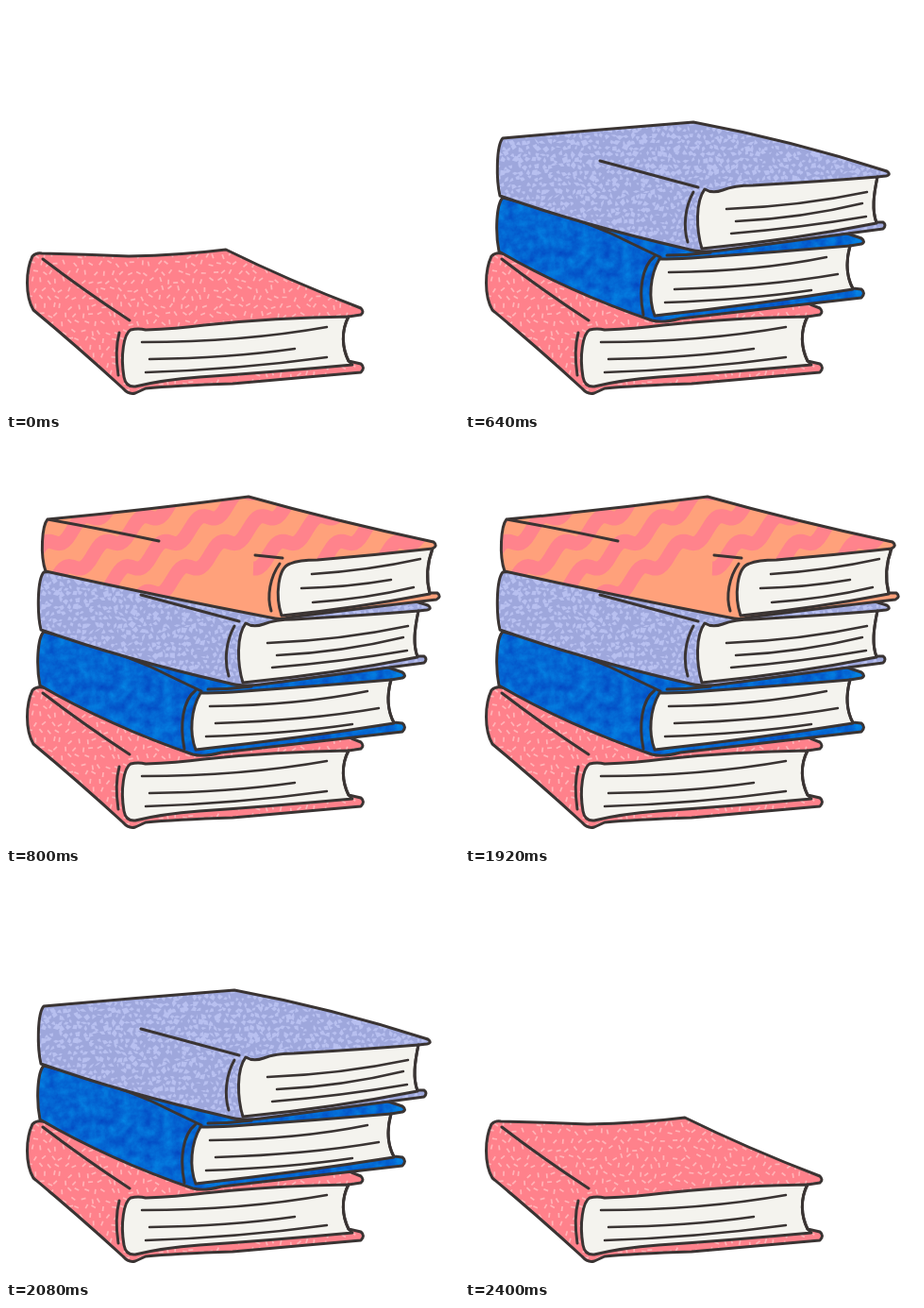
These frames come from a looping animation (480x430 px, 2880 ms). An HTML page:

```html
<!DOCTYPE html>
<html lang="en">
<head>
<meta charset="utf-8">
<title>Book stack</title>
<style>
  html, body { margin: 0; width: 100%; height: 100%; overflow: hidden; background: #fff; }
  svg { display: block; width: 100vw; height: 100vh; }
  .ink { fill: none; stroke: #3a3433; stroke-width: 3; stroke-linecap: round; stroke-linejoin: round; }
  .lines { stroke-width: 2.5; }
  .page { fill: #f4f3ee; }
  .book { animation: 2880ms step-end infinite; }
  #blue { animation-name: blue; }
  #lilac { animation-name: lilac; }
  #orange { animation-name: orange; }
  #sky { animation-name: sky; }
  @keyframes blue { 0%, 83.33% { visibility: hidden; } 16.66% { visibility: visible; } }
  @keyframes lilac { 0%, 77.77% { visibility: hidden; } 22.22% { visibility: visible; } }
  @keyframes orange { 0%, 72.22% { visibility: hidden; } 27.77% { visibility: visible; } }
  @keyframes sky { 0%, 66.66% { visibility: hidden; } 33.33% { visibility: visible; } }
</style>
</head>
<body>
<svg id="stage" viewBox="0 0 480 430">
  <defs>
    <filter id="cloth" x="0" y="0" width="1" height="1" color-interpolation-filters="sRGB">
      <feTurbulence type="fractalNoise" baseFrequency=".09" numOctaves="5" seed="4"/>
      <feColorMatrix values="0 0 0 0 .015  .3 0 0 0 .25  .17 0 0 0 .74  0 0 0 0 1"/>
    </filter>
  </defs>
</svg>
<script>
const stage = document.getElementById('stage');

function randomizer(seed) {
  return () => {
    seed = (seed + 0x6D2B79F5) | 0;
    let t = Math.imul(seed ^ (seed >>> 15), 1 | seed);
    t = (t + Math.imul(t ^ (t >>> 7), 61 | t)) ^ t;
    return ((t ^ (t >>> 14)) >>> 0) / 4294967296;
  };
}

// Jittered grid of marks joined into one path
function scatter([x0, y0, x1, y1], step, seed, mark) {
  const rnd = randomizer(seed);
  let d = '', row = 0;
  for (let y = y0; y < y1; y += step, row++)
    for (let x = x0 + (row % 2) * step / 2; x < x1; x += step)
      d += mark(x + (rnd() - .5) * step * .5, y + (rnd() - .5) * step * .5, rnd);
  return d;
}

// Closed polygon with uneven corners
function blob(x, y, r, n, rough, rnd) {
  const turn = rnd() * 6.28, pts = [];
  for (let i = 0; i < n; i++) {
    const a = turn + i * 2 * Math.PI / n, q = r * (1 - rough * rnd());
    pts.push((x + q * Math.cos(a)).toFixed(1) + ' ' + (y + q * Math.sin(a)).toFixed(1));
  }
  return 'M' + pts.join('L') + 'Z';
}

function dashes() {
  const d = scatter([18, 255, 385, 415], 9, 7, (x, y, rnd) => {
    const a = rnd() * Math.PI, u = 2.5 * Math.cos(a), v = 2.5 * Math.sin(a);
    return `M${(x - u).toFixed(1)} ${(y - v).toFixed(1)}l${(2 * u).toFixed(1)} ${(2 * v).toFixed(1)}`;
  });
  return `<path d="${d}" fill="none" stroke="#ffb4b7" stroke-width="1.7"/>`;
}

function chips() {
  const d = scatter([30, 118, 452, 265], 6.5, 21, (x, y, rnd) => blob(x, y, 4.6, 4, .85, rnd));
  return `<path d="${d}" fill="#b8c0f0"/>`;
}

// Wavy diagonal bands; those on the right stay on the top face
function waves() {
  let d = '';
  for (let x0 = -132; x0 < 460; x0 += 62) {
    const start = x0 > 150 ? 84 : 0;
    for (let t = start; t <= 240; t += 3)
      d += `${t > start ? 'L' : 'M'}${x0 + t} ${(188 - .66 * t + 6.5 * Math.sin(t / 6.4)).toFixed(1)}`;
  }
  return `<path d="${d}" fill="none" stroke="#ff838c" stroke-width="15" stroke-linejoin="round"/>`;
}

function dots() {
  const d = scatter([84, 18, 464, 120], 15, 5, (x, y, rnd) => blob(x, y, 2 + rnd() * 2.4, 7, .25, rnd));
  return `<path d="${d}" fill="#a4e3fb" stroke="#a4e3fb" stroke-linejoin="round"/>`;
}

const books = [
  {
    id: 'pink', color: '#ff818b', art: dashes(),
    cover: 'M38 262Q85 263 130 265Q185 264 233 258Q298 290 376 320Q380 324 376 327L363 329C355 344 356 362 363 376L376 379Q381 383 376 388Q300 395 240 400Q178 402 148 405L137 410Q130 412 124 405Q76 361 29 322C20 306 21 280 28 265Q32 261 38 262Z',
    page: 'M132 343Q140 341 148 343Q180 342 210 338Q285 330 363 329C355 344 356 362 363 376L367 380Q280 388 205 393Q165 396 137 403Q127 404 125 393C121 370 125 347 132 343Z',
    hinge: 'M39 268Q82 301 131 333M120 346Q115 365 119 391',
    lines: 'M144 356Q250 356 340 340M152 374Q235 373 306 363M148 388Q245 385 340 372'
  },
  {
    id: 'blue', color: '#0563d1',
    art: '<rect x="28" y="172" width="402" height="170" filter="url(#cloth)"/>',
    cover: 'M40 203Q140 192 238 178Q325 215 420 246Q425 250 420 252L408 254C403 272 405 288 411 299L420 300Q425 304 420 309Q310 322 228 331Q210 336 198 333Q110 303 36 260C32 240 33 210 40 203Z',
    page: 'M206 268Q220 268 240 267Q325 261 408 254C403 272 405 288 411 300Q310 316 201 328C194 310 196 285 206 268Z',
    hinge: 'M40 203Q105 219 155 241Q188 257 207 266M201 265C187 276 184 302 189 327M214 264Q237 264 260 261',
    lines: 'M216 282Q310 281 383 266M222 300Q320 297 395 284M212 314Q300 311 367 301'
  },
  {
    id: 'lilac', color: '#9ea7dc', art: chips(),
    cover: 'M40 140Q140 131 242 123Q345 142 447 175Q452 179 446 180L437 181C433 200 431 216 436 229L443 229Q447 232 443 236Q345 249 270 259Q250 262 234 257Q125 232 37 201C33 184 33 148 40 140Z',
    page: 'M254 194Q262 199 273 195Q285 190 305 190Q375 186 437 181C433 200 431 216 436 230Q345 248 251 257C245 237 244 207 254 194Z',
    hinge: 'M143 164Q195 178 247 192M242 197C233 213 231 234 236 250',
    lines: 'M277 215Q355 212 426 197M287 228Q355 225 421 209M282 241Q355 235 425 223'
  },
  {
    id: 'orange', color: '#ffa17b', art: waves(),
    cover: 'M44 84Q150 74 257 60Q350 86 453 108Q458 112 452 115C446 131 445 147 449 162L457 162Q462 166 456 169Q370 179 300 188Q291 191 280 188Q160 165 42 139C36 122 38 91 44 84Z',
    page: 'M301 131Q310 127 330 127Q390 122 452 115C446 131 445 147 449 163Q365 179 292 186C285 165 288 135 301 131Z',
    hinge: 'M44 84Q105 95 162 107M264 122L293 125M290 131C280 145 276 165 281 181',
    lines: 'M324 142Q385 138 439 126M313 157Q362 156 408 148M325 172Q382 168 432 156'
  },
  {
    id: 'sky', color: '#00bbfd', art: dots(),
    cover: 'M95 19Q190 23 290 23Q375 40 457 56Q465 58 458 59L448 61C436 75 437 95 441 108L455 107Q459 110 454 113Q340 113 240 115Q222 117 208 114Q145 97 86 72C82 50 86 27 95 19Z',
    page: 'M226 53Q238 50 255 52Q350 57 448 61C436 75 437 95 441 108Q330 110 230 110Q220 110 219 98C216 80 218 58 226 53Z',
    hinge: 'M95 19Q155 35 215 50M218 55C208 70 208 95 213 109',
    lines: 'M252 74Q345 78 431 73M259 92Q345 92 426 89M247 101Q340 103 427 98'
  }
];

const drawBook = b => `
  <g class="book" id="${b.id}">
    <clipPath id="${b.id}-clip"><path d="${b.cover}"/></clipPath>
    <path d="${b.cover}" fill="${b.color}"/>
    <g clip-path="url(#${b.id}-clip)">${b.art}</g>
    <path class="ink page" d="${b.page}"/>
    <path class="ink" d="${b.cover}${b.hinge}"/>
    <path class="ink lines" d="${b.lines}"/>
  </g>`;

stage.insertAdjacentHTML('beforeend', books.map(drawBook).join(''));
</script>
</body>
</html>
```
